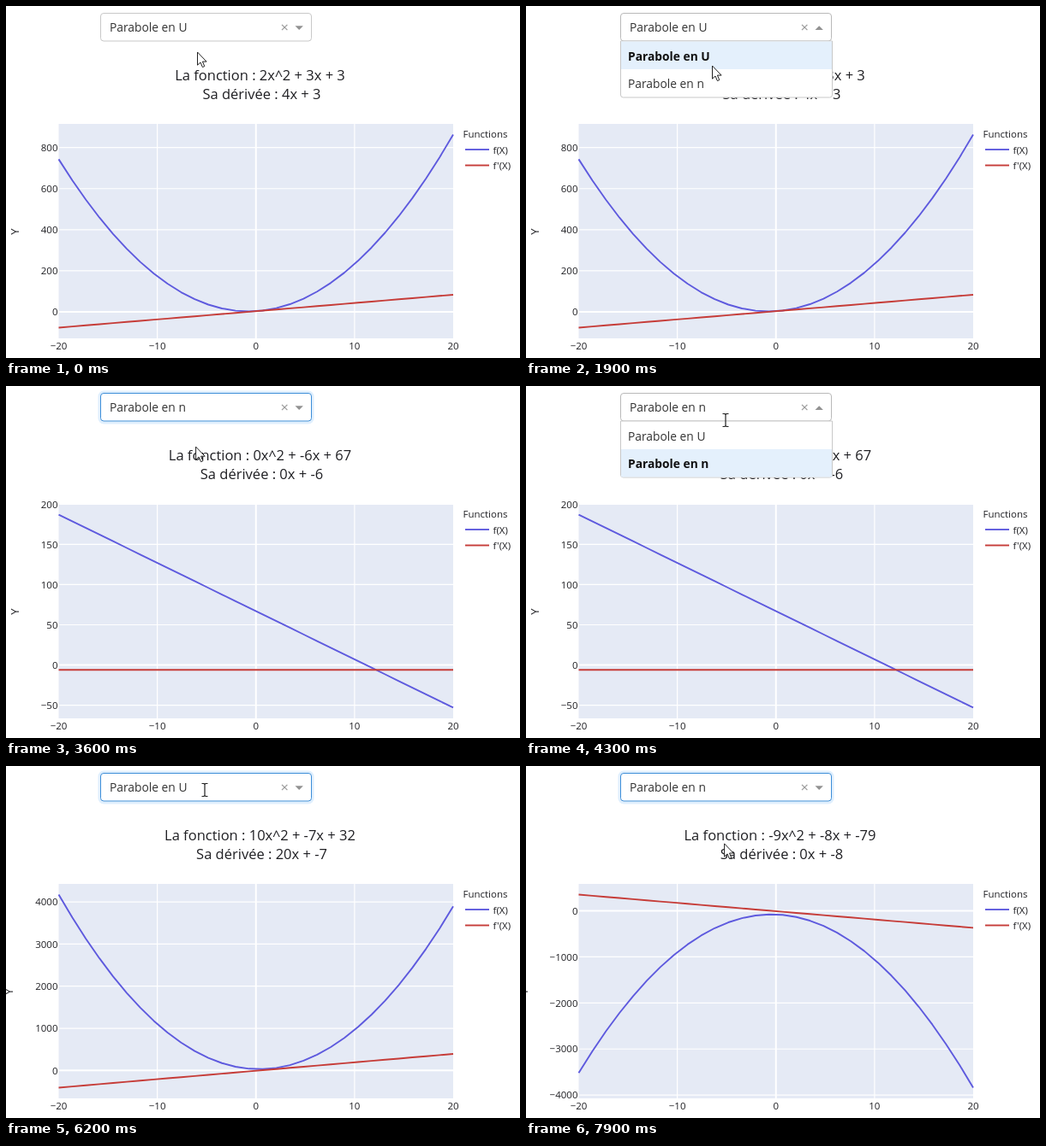
Recreate the animation shown at these times as an HTML page. Size 600x412 px, loop 8 s.

```html
<!DOCTYPE html>
<html lang="fr">
<head>
<meta charset="utf-8">
<style>
  html, body { margin: 0; width: 600px; height: 412px; overflow: hidden; background: #fff; }
  svg { display: block; font: 11.5px "Open Sans", "Noto Sans", sans-serif; fill: #1f1f23; }
</style>
</head>
<body>
<svg id="stage" width="600" height="412" viewBox="0 0 600 412"></svg>
<script>
const LOOP = 8000, STEP = 100;
const BLUE = '#5e5ade', RED = '#c63c38';
const LEFT = 61.5, RIGHT = 522, TOP = 138, BOTTOM = 389, PAD = 12.55, SAMPLES = 30;
const OPTIONS = ['Parabole en U', 'Parabole en n'];

// Each function appears at `at`; `slope` is the derivative as printed.
const functions = [
  { at: 0, a: 2, b: 3, c: 3, slope: 4, tick: 200 },
  { at: 3000, a: 0, b: -6, c: 67, slope: 0, tick: 50 },
  { at: 5500, a: 10, b: -7, c: 32, slope: 20, tick: 1000 },
  { at: 7500, a: -9, b: -8, c: -79, slope: 0, tick: 1000 }
];

const menuStates = [
  { at: 0, value: 0 },
  { at: 1300, value: 0, open: true },
  { at: 2500, value: 1, focus: true },
  { at: 4300, value: 1, open: true },
  { at: 5000, value: 0, focus: true },
  { at: 6500, value: 0, open: true },
  { at: 7100, value: 1, focus: true }
];

// time, x, y of the pointer
const pointerPath = [
  [0, 223, 54], [900, 230, 41], [1300, 230, 38], [1900, 217, 70], [2300, 217, 82],
  [3400, 217, 82], [4000, 233, 40], [4300, 233, 40], [4800, 217, 57], [5300, 217, 57],
  [5900, 218, 90], [6000, 218, 90], [6200, 232, 28], [6500, 232, 28], [6900, 232, 76],
  [7400, 232, 90], [8000, 231, 91]
];

const current = (list, t) => list.filter(item => item.at <= t).pop();
const line = (x1, y1, x2, y2, color, width = 1) =>
  `<path d="M${x1} ${y1}L${x2} ${y2}" stroke="${color}" stroke-width="${width}"/>`;
const rect = (x, y, w, h, attrs) => `<rect x="${x}" y="${y}" width="${w}" height="${h}" ${attrs}/>`;
const text = (x, y, str, attrs = '') => `<text x="${x}" y="${y}" ${attrs}>${str}</text>`;
const number = n => String(n).replace('-', '−');

function pointerAt(t) {
  const i = pointerPath.findIndex(key => key[0] > t);
  const [t0, x0, y0] = pointerPath[i - 1], [t1, x1, y1] = pointerPath[i];
  const p = (t - t0) / (t1 - t0), e = p * p * (3 - 2 * p);
  return { x: x0 + (x1 - x0) * e, y: y0 + (y1 - y0) * e };
}

function chart({ a, b, c, tick }) {
  const xs = Array.from({ length: SAMPLES }, (_, i) => -20 + 40 * i / (SAMPLES - 1));
  const f = x => a * x * x + b * x + c;
  const df = x => 2 * a * x + b;
  const values = xs.flatMap(x => [f(x), df(x)]);
  const min = Math.min(...values), max = Math.max(...values);
  const scale = (BOTTOM - TOP - 2 * PAD) / (max - min);
  const px = x => LEFT + (x + 20) * (RIGHT - LEFT) / 40;
  const py = y => TOP + PAD + (max - y) * scale;
  const curve = (fn, color) =>
    `<polyline points="${xs.map(x => px(x).toFixed(2) + ',' + py(fn(x)).toFixed(2)).join(' ')}"
      fill="none" stroke="${color}" stroke-width="1.9" stroke-linejoin="round"/>`;

  let out = rect(LEFT, TOP, RIGHT - LEFT, BOTTOM - TOP, 'fill="#e5eaf5"');
  for (let x = -20; x <= 20; x += 10) {
    if (Math.abs(x) < 20) out += line(px(x), TOP, px(x), BOTTOM, '#fff', x ? 1.2 : 2);
    out += text(px(x), 402, number(x), 'text-anchor="middle"');
  }
  const lowest = Math.ceil((min - PAD / scale) / tick) * tick;
  let digits = 0;
  for (let y = lowest; py(y) >= TOP; y += tick) {
    out += line(LEFT, py(y), RIGHT, py(y), '#fff', y ? 1.2 : 2);
    out += text(60.5, py(y) + 4.2, number(y), 'text-anchor="end"');
    digits = Math.max(digits, String(y).length);
  }
  out += curve(f, BLUE) + curve(df, RED);

  // wider tick labels push the axis title left
  const titleX = 14.5 - 6.4 * (digits - 3);
  out += text(0, 0, 'Y', `font-size="13" text-anchor="middle" transform="translate(${titleX} 264) rotate(-90)"`);
  out += text(533.5, 154, 'Functions');
  [['f(X)', BLUE], ["f'(X)", RED]].forEach(([name, color], i) => {
    out += line(536, 168 + 18.5 * i, 564, 168 + 18.5 * i, color, 1.9);
    out += text(568.5, 172.5 + 18.5 * i, name);
  });
  return out;
}

function heading({ a, b, c, slope }) {
  const style = 'font-size="16.5" text-anchor="middle"';
  return text(296.5, 87, `La fonction : ${a}x^2 + ${b}x + ${c}`, style) +
    text(298.5, 108.5, `Sa dérivée : ${slope}x + ${b}`, style);
}

function dropdown({ value, open, focus }, pointer) {
  let out = '';
  if (focus) out += rect(109, 7, 249, 36, 'rx="5" fill="none" stroke="#e0effd" stroke-width="3"');
  out += rect(110.5, 8.5, 246, 32.5, `rx="3.5" fill="#fff" stroke="${focus ? '#3c8ed8' : open ? '#b9b9b9' : '#c8c8c8'}"`);
  out += text(121, 30, OPTIONS[value], 'font-size="13.8" fill="#333"');
  out += '<path d="M322 21.8l6.4 6.4m0-6.4l-6.4 6.4" stroke="#999" stroke-width="1.2"/>';
  out += `<path d="${open ? 'M337.5 28h9.4l-4.7-4.8z' : 'M337.5 23.2h9.4l-4.7 4.8z'}" fill="#929292"/>`;
  if (!open) return out;

  const hovered = pointer.y <= 41 ? value : pointer.y < 74 ? 0 : 1;
  out += '<path d="M110.5 41H357.5V104q0 3-3 3H113.5q-3 0-3-3z" fill="#fff" stroke="#c8c8c8"/>';
  out += rect(111, 41.5 + 32.5 * hovered, 246, 32.5, 'fill="#e4f0fc"');
  OPTIONS.forEach((name, i) => {
    const style = i === value ? 'font-weight="700" fill="#111"' : 'fill="#333"';
    out += text(119, 63.5 + 32.5 * i, name, `font-size="13.8" ${style}`);
  });
  return out;
}

function cursor({ x, y }) {
  const shape = y <= 41
    ? '<path d="M-3.5-7.5h2.5l1 1 1-1h2.5M0-6.5v13M-3.5 7.5h2.5l1-1 1 1h2.5" fill="none" stroke="#222" stroke-width="1.2"/>'
    : '<path d="M.5 0V15.2L4 12l2.4 5.6 2.4-1-2.4-5.5h4.7z" fill="#fff" stroke="#222"/>';
  return `<g transform="translate(${x.toFixed(1)} ${y.toFixed(1)})">${shape}</g>`;
}

const stage = document.getElementById('stage');
let drawn = -1;

function render(now) {
  const t = Math.floor(now % LOOP / STEP) * STEP;
  if (t !== drawn) {
    drawn = t;
    const fn = current(functions, t), pointer = pointerAt(t);
    stage.innerHTML = chart(fn) + heading(fn) + dropdown(current(menuStates, t), pointer) + cursor(pointer);
  }
  requestAnimationFrame(render);
}
render(0);
</script>
</body>
</html>
```
